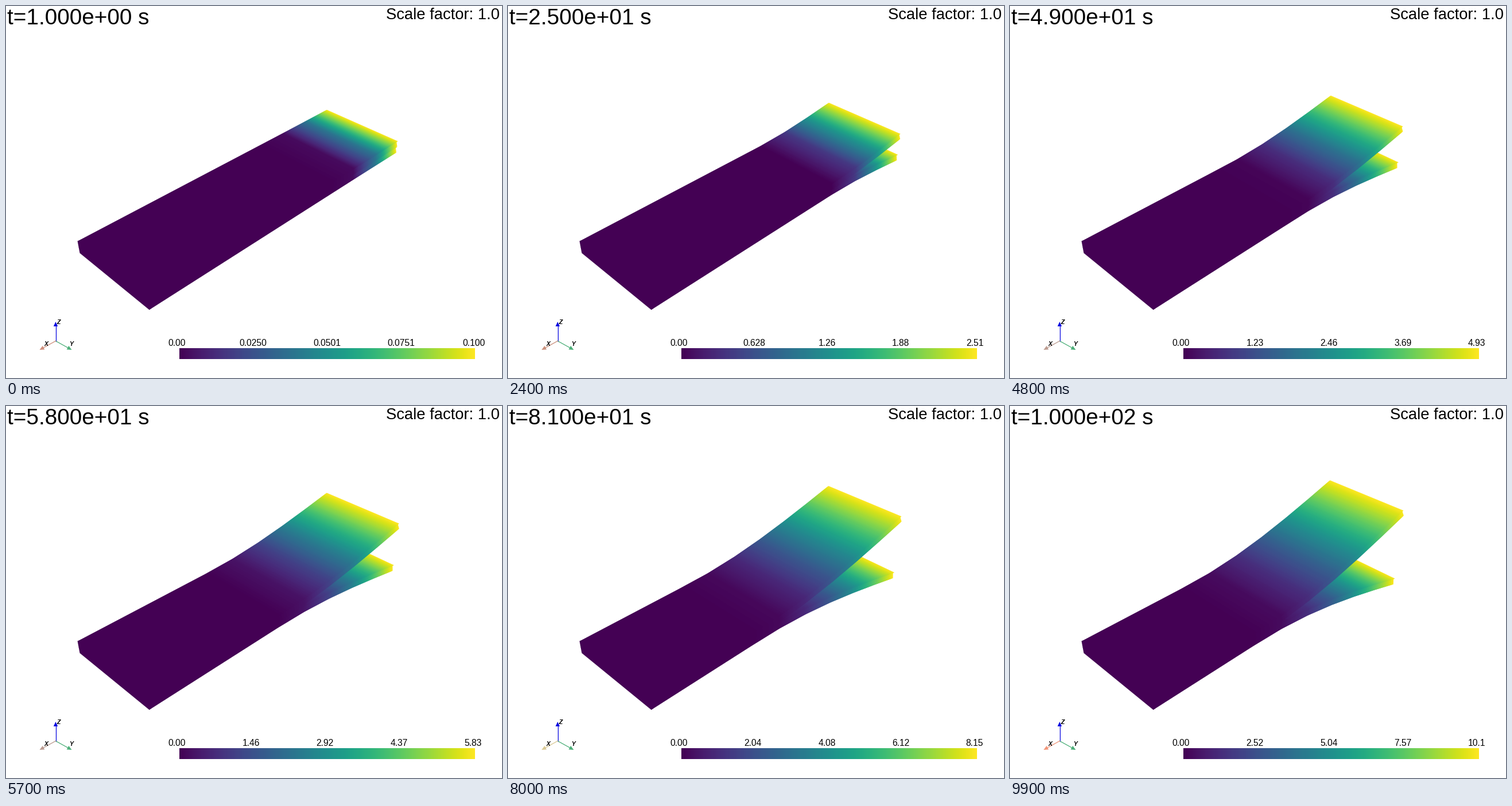
Write a matplotlib script that moves like this. It is 864 px wide and 648 px high and loops after 10 s.

```python
import numpy as np
import matplotlib.pyplot as plt
from matplotlib.animation import FuncAnimation
from matplotlib.collections import PolyCollection

STAGE_W, STAGE_H, DPI = 864, 648, 100
STEPS = 100

# Beam split at mid-height, seen by an isometric perspective camera
L, W, H = 85.0, 25.0, 3.4
DIST = np.sqrt(L**2 + W**2 + H**2) / 2 / np.sin(np.radians(15))
FOCAL = STAGE_H / 2 / np.tan(np.radians(15))
NODES = np.linspace(0, L, 10)
FINE = np.linspace(0, L, 9 * 24 + 1)
TUCK = 0.5  # how far a face reaches under its neighbour

CRACK_T = [1, 12, 25, 40, 58, 68, 81, 100]
CRACK_LEN = [21.6, 22.5, 29, 35.8, 46.4, 52.3, 53.3, 54.8]

X_TINT_T = [1, 25, 40, 58, 68, 81, 100]
X_TINT = np.array([(208, 144, 126), (202, 146, 126), (190, 156, 144),
                   (188, 156, 146), (232, 216, 92), (218, 202, 150),
                   (242, 150, 122)]) / 255

plt.rcParams["font.family"] = "Liberation Sans"
fig = plt.figure(figsize=(STAGE_W / DPI, STAGE_H / DPI), dpi=DPI,
                 facecolor="white")
ax = fig.add_axes([0, 0, 1, 1])


def project(x, y, z):
    x, y = x - L / 2, y - W / 2
    scale = FOCAL / (DIST - (x + y + z) / np.sqrt(3))
    return np.column_stack([STAGE_W / 2 + scale * (y - x) / np.sqrt(2),
                            STAGE_H / 2 - scale * (2 * z - x - y) / np.sqrt(6)])


def arm(t, side):
    """Outer and inner edges of one arm as (x, z, displacement)."""
    tip, crack = 0.1 * t, np.interp(t, CRACK_T, CRACK_LEN)
    k = np.minimum(NODES / crack, 1)
    lift = tip * (1 - 1.5 * k + 0.5 * k**3)
    slope = 1.5 * tip / crack * (1 - k**2)
    shift = 1.125 * tip**2 / crack * (8 / 15 - k + 2 * k**3 / 3 - k**5 / 5)
    edges = []
    for z, turn in ((side * H / 2, 1), (0, -1)):
        ux = shift + turn * H / 4 * slope
        cols = (NODES + ux, z + side * lift, np.hypot(ux, lift))
        edges.append([np.interp(FINE, NODES, c) for c in cols])
    return edges


def strip(edge_a, y_a, edge_b, y_b):
    """Quads between two edges; each runs under the next to avoid seams."""
    p = project(edge_a[0], y_a, edge_a[1])
    q = project(edge_b[0], y_b, edge_b[1])
    i = np.arange(len(FINE) - 1)
    j = np.minimum(i + 2, len(FINE) - 1)
    mag = (edge_a[2] + edge_b[2]) / 2
    return np.stack([p[i], p[j], q[j], q[i]], axis=1), (mag[:-1] + mag[1:]) / 2


def clamped_end():
    x = L - TUCK * np.array([1, 1, 1, 0])
    quad = project(x, np.array([0, W, W, W]), np.array([1, 1, -1, -1]) * H / 2)
    corner = project(np.full(2, L), np.zeros(2), np.array([-1, 1]) * H / 2)
    return [np.concatenate([quad, corner])], np.zeros(1)


def solid(t):
    top, top_in = arm(t, 1)
    low, low_in = arm(t, -1)
    parts = [clamped_end(),
             strip(low_in, W - TUCK, low, W),
             strip(low_in, 0, low_in, W),
             strip(top, W - TUCK, top_in, W),
             strip(top, 0, top, W)]
    quads = [quad for faces, _ in parts for quad in faces]
    return quads, np.concatenate([m for _, m in parts]), top[2].max()


def label(x, y, text, px, **kw):
    return ax.text(x, y, text, fontsize=px * 72 / DPI, color="black",
                   va="baseline", **kw)


def arrow(tip, color):
    """Triad axis from the shared origin: shaft plus cone."""
    start, tip = np.array([86.5, 583.5]), np.array(tip)
    d = (tip - start) / np.hypot(*(tip - start))
    n = np.array([-d[1], d[0]])
    base = tip - 8 * d
    shaft, = ax.plot(*zip(start, base), color=color, lw=1.3 * 72 / DPI)
    cone, = ax.fill(*zip(tip, base + 3.7 * n, base - 3.7 * n),
                    color=color, lw=0)
    return shaft, cone


body = PolyCollection([], cmap="viridis", linewidths=0, edgecolors="none")
ax.add_collection(body)

ax.imshow(np.linspace(0, 1, 256)[None], cmap="viridis", aspect="auto",
          interpolation="nearest", extent=(302, 817, 615, 596))

arrow((86.5, 550), "#0a0ae0")
arrow((114.5, 599), "#4fb07a")
x_axis = arrow((58.5, 599), "#d0907e")
for name, x, y in (("X", 70, 592.5), ("Y", 114, 592.5), ("Z", 91, 553.5)):
    label(x, y, name, 10.5, ha="center", weight="bold", style="italic")

title = label(2.5, 32.5, "", 38.7)
label(860, 23, "Scale factor: 1.0", 27.4, ha="right")
ticks = [label(0, 592, "", 15.6, ha="center") for _ in range(5)]

ax.set_xlim(0, STAGE_W)
ax.set_ylim(STAGE_H, 0)
ax.axis("off")


def update(step):
    t = step + 1
    quads, mags, peak = solid(t)
    body.set_verts(quads)
    body.set_array(mags)
    body.set_clim(0, peak)
    title.set_text(f"t={t:.3e} s")
    for i, tick in enumerate(ticks):
        text = f"{peak * i / 4:#.3g}" if i else "0.00"
        # short labels sit left of their tick, as if padded to six characters
        tick.set_text(text)
        tick.set_x(302 + 515 * i / 4 - 2 * (6 - len(text)))
    tint = [np.interp(t, X_TINT_T, X_TINT[:, c]) for c in range(3)]
    for part in x_axis:
        part.set_color(tint)
    return [body, title, *ticks, *x_axis]


anim = FuncAnimation(fig, update, frames=STEPS, interval=100, repeat=True,
                     repeat_delay=0, blit=False)
plt.show()
```
